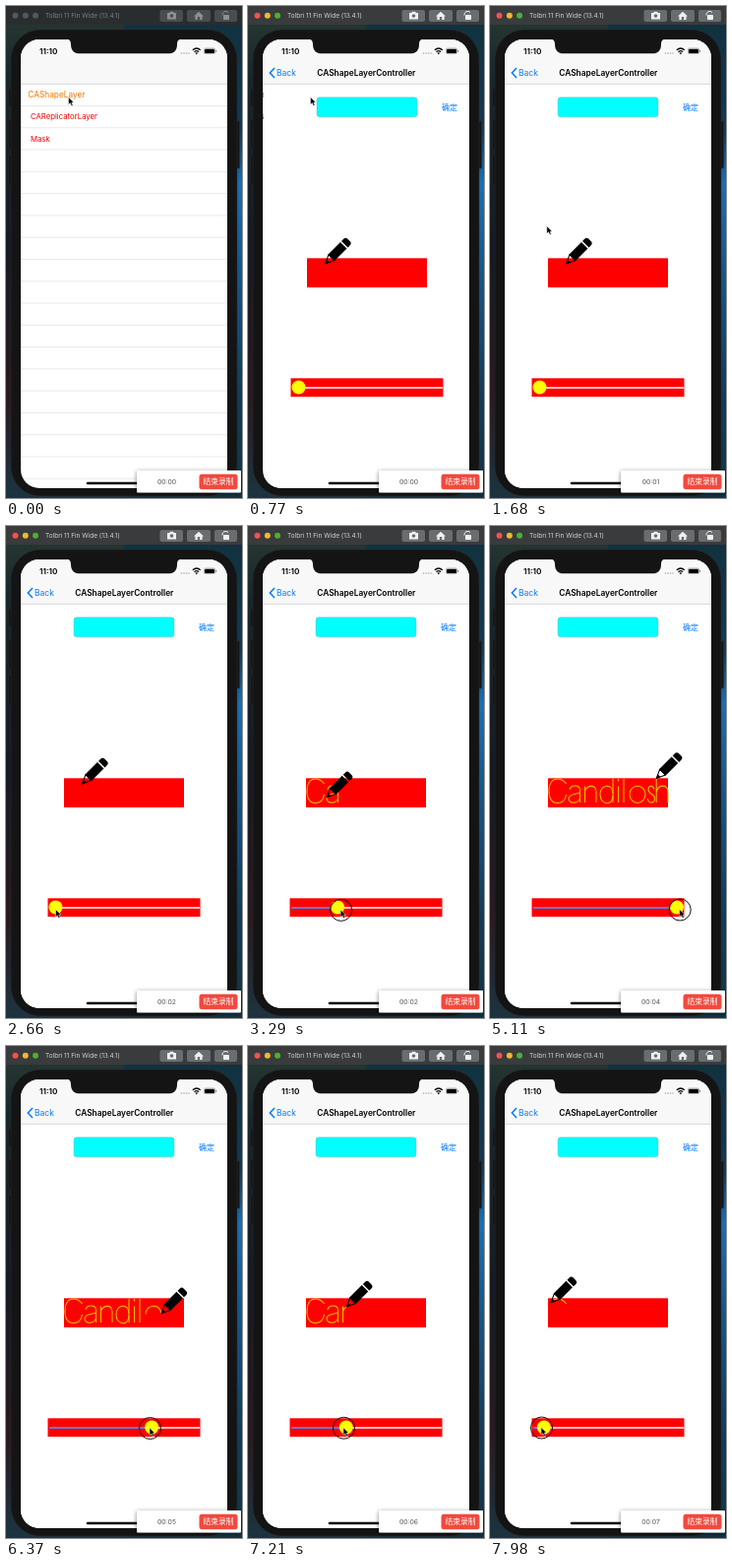
These frames come from a looping animation (240x500 px, 8000 ms). An HTML page:

```html
<!DOCTYPE html>
<html lang="en">
<head>
<meta charset="utf-8">
<title>Shape layer demo</title>
<style>
  html, body { margin: 0; width: 100%; height: 100%; overflow: hidden; background: #10202a; }
  svg { display: block; width: 240px; height: 500px; }
  text { font-family: Inter, "Noto Sans CJK SC", "Noto Sans CJK", sans-serif; }
  .blue { fill: #007aff; }
</style>
</head>
<body>
<svg viewBox="0 0 240 500">
  <defs>
    <linearGradient id="wallLeft" x2="0" y2="1">
      <stop offset="0" stop-color="#2a3a34"/>
      <stop offset=".15" stop-color="#17262a"/>
      <stop offset=".5" stop-color="#161a22"/>
      <stop offset=".8" stop-color="#2a1a20"/>
      <stop offset="1" stop-color="#1c3440"/>
    </linearGradient>
    <linearGradient id="wallRight" x2="0" y2="1">
      <stop offset="0" stop-color="#12303a"/>
      <stop offset=".25" stop-color="#0f3a58"/>
      <stop offset=".36" stop-color="#1a6fb4"/>
      <stop offset=".55" stop-color="#15568c"/>
      <stop offset=".8" stop-color="#103c5a"/>
      <stop offset="1" stop-color="#123444"/>
    </linearGradient>
    <clipPath id="screen"><rect x="15" y="34" width="210" height="456" rx="19"/></clipPath>
    <filter id="shadow" x="-10%" y="-50%" width="120%" height="200%">
      <feDropShadow dx="0" dy="1" stdDeviation="2.2" flood-opacity=".5"/>
    </filter>
  </defs>

  <rect width="120" height="500" fill="url(#wallLeft)"/>
  <rect x="120" width="120" height="500" fill="url(#wallRight)"/>

  <!-- simulator window title bar -->
  <rect id="bar" width="240" height="19"/>
  <g id="lights">
    <circle cx="9.5" cy="9.7" r="3" fill="#ff4f48"/>
    <circle cx="19.8" cy="9.7" r="3" fill="#f5b52a"/>
    <circle cx="30" cy="9.7" r="3" fill="#4fae34"/>
  </g>
  <g id="grayLights" fill="#56595b">
    <circle cx="9.5" cy="9.7" r="3"/><circle cx="19.8" cy="9.7" r="3"/><circle cx="30" cy="9.7" r="3"/>
  </g>
  <g id="tools">
    <text x="40" y="12.2" font-size="6.5" fill="#d2d3d4">Tolbri 11 Fin Wide (13.4.1)</text>
    <g fill="#6a6d6f">
      <rect x="156.5" y="4" width="23.5" height="12" rx="2"/>
      <rect x="184" y="4" width="24" height="12" rx="2"/>
      <rect x="212" y="4" width="23" height="12" rx="2"/>
    </g>
    <g fill="#f0f0f0">
      <path d="M164 7h2l1-1.3h3l1 1.3h2v6.5h-9z"/>
      <path d="M191 10.4l5-4.6 5 4.6h-1.4v3.6h-2.4v-3h-2.4v3h-2.4v-3.6z"/>
      <rect x="221" y="9" width="6" height="5" rx=".8"/>
    </g>
    <circle cx="168.5" cy="10" r="1.8" fill="#6a6d6f"/>
    <path d="M220 9.5a3.5 3.5 0 0 1 6-3" fill="none" stroke="#f0f0f0"/>
  </g>

  <!-- phone body -->
  <g fill="#141414" stroke="#2a2e30" stroke-width=".5">
    <rect x="2.5" y="84" width="4" height="18" rx="1"/>
    <rect x="2.5" y="115" width="4" height="30" rx="1"/>
    <rect x="2.5" y="151" width="4" height="31" rx="1"/>
    <rect x="233.5" y="117" width="4" height="48" rx="1"/>
    <rect x="5" y="24" width="230" height="474" rx="30"/>
  </g>

  <g clip-path="url(#screen)">
    <rect x="15" y="34" width="210" height="456" fill="#fff"/>
    <g id="list">
      <g id="rows" stroke="#e0e0e3" stroke-width=".7"></g>
      <text x="22.3" y="93" font-size="8.3" fill="#f07800">CAShapeLayer</text>
      <g font-size="7.75" fill="#f00000">
        <text x="25" y="115.2">CAReplicatorLayer</text>
        <text x="25" y="137.5">Mask</text>
      </g>
    </g>

    <g id="detail">
      <rect x="15" y="34" width="211" height="456" fill="#fff"/>
      <rect x="69" y="92.8" width="102" height="20" rx="2.8" fill="#0ff" stroke="#7fb4b6" stroke-width=".5"/>
      <text x="196" y="106" font-size="8" class="blue">确定</text>
      <rect x="59" y="256.3" width="122" height="29.7" fill="red"/>
      <g id="word" role="img" aria-label="Candilosh" fill="none" stroke="#e8c400" stroke-width="1.05"></g>
      <g id="pencil"><g transform="rotate(-45)">
        <path d="M0 0L9-4.1V4.1Z" fill="none" stroke="#000" stroke-linejoin="round"/>
        <path d="M0 0L4-2V2ZM8.5-4.6H26.5V4.6H8.5ZM28-4.6H31Q34-4.6 34-1.6V1.6Q34 4.6 31 4.6H28Z"/>
      </g></g>
      <rect x="42.5" y="378.3" width="155" height="18.8" fill="red"/>
      <path d="M44 388H197" stroke="#fff" stroke-width="1.6"/>
      <path id="filled" stroke="#2864dc" stroke-width="1.6"/>
      <circle id="thumb" cy="387.5" r="7" fill="#ff0"/>
    </g>

    <!-- navigation and status bars -->
    <rect x="15" y="34" width="210" height="45" fill="#f8f8f8"/>
    <path d="M15 79.3H225" stroke="#bcbcc0" stroke-width=".6"/>
    <g id="nav">
      <path d="M27 63L22.3 68 27 73" fill="none" stroke="#007aff" stroke-width="1.5"/>
      <text x="29" y="71" font-size="8.5" class="blue">Back</text>
      <text x="120.3" y="71" font-size="8.4" font-weight="600" text-anchor="middle">CAShapeLayerController</text>
    </g>
    <text x="34" y="48.7" font-size="8.2" font-weight="600">11:10</text>
    <g fill="#aaa">
      <circle cx="178.5" cy="48" r=".8"/><circle cx="181" cy="48" r=".8"/>
      <circle cx="183.5" cy="48" r=".8"/><circle cx="186" cy="48" r=".8"/>
    </g>
    <path d="M189.8 44.8q4-3.6 8 0M191.4 46.6q2.4-2 4.8 0" fill="none" stroke="#000" stroke-width="1.2"/>
    <path d="M192.4 47.8q1.4-1 2.8 0l-1.4 1.4z"/>
    <rect x="201.3" y="43" width="11.4" height="5.6" rx="1.5" fill="none" stroke="#777" stroke-width=".5"/>
    <rect x="202" y="43.7" width="10" height="4.2" rx="1"/>
    <path d="M213.6 44.8v2" stroke="#777"/>
    <path d="M83 485H158" stroke="#000" stroke-width="2.6" stroke-linecap="round"/>
  </g>
  <path d="M61 33C65 34 66 36 66 39C66 45 69 48.3 75 48.3H165C171 48.3 174 45 174 39C174 36 175 34 179 33Z" fill="#141414"/>

  <!-- recorder panel -->
  <rect x="133" y="472" width="106" height="22.5" rx="1" fill="#fff" filter="url(#shadow)"/>
  <text id="clock" x="163.5" y="486" font-size="6.8" fill="#555" text-anchor="middle"></text>
  <rect x="196.5" y="475.8" width="39" height="15.4" rx="2.8" fill="#f2493d"/>
  <text x="216" y="486.3" font-size="7.8" font-weight="500" fill="#fff" text-anchor="middle">结束录制</text>

  <g id="pointer">
    <circle id="ring" r="11" fill="none" stroke="#111" stroke-width="1"/>
    <path d="M-.5-.5V7.2L1.3 5.6 2.6 8.4 4 7.7 2.8 5.1H5Z" stroke="#fff" stroke-width=".5"/>
  </g>
</svg>
<script>
const LOOP = 8000, STEP = 70;
const PUSH_START = 210, PRESS_START = 2800;
const THUMB_MIN = 50.5, THUMB_MAX = 190, THUMB_LAG = 40;

// time, x, y
const POINTER = [
  [0, 64, 93], [1190, 64, 93], [2300, 51, 390], [2800, 51, 390], [3990, 157, 391],
  [4600, 194, 390], [5250, 193, 390], [6370, 146.5, 388.5], [7980, 52.5, 388]
];

// Subpaths in writing order; the pen follows each one out and back.
const LETTERS = [
  'M77.5 262C75 258.5 72 257 68.5 257C63 257 60 262 60 269C60 277 63 281.5 68.5 281.5C73 281.5 76.5 279 77.5 273',
  'M81 268C82 262.5 91.5 262.5 91.5 268.5V281M91.5 271C88 272.5 80 272 80 277C80 283 90.5 282.5 91.5 276',
  'M96.5 281V264.5M96.5 270C98 263 108 262 108 270V281',
  'M125 274C125 285 112 284 112 272.8C112 262 125 261 125 272M125 257V281',
  'M130.5 264.5V281M130.5 257V259.5',
  'M136 257V281',
  'M142 272.8A8 8.6 0 0 1 158 272.8A8 8.6 0 0 1 142 272.8',
  'M167 267.5C165.5 263 161 263.5 161 268C161 273 167.5 271.5 167.5 277C167.5 282.5 161 282.5 160.3 277',
  'M169.2 256.5V281V271C170.5 262 181 262 181 270V281'
];

const el = id => document.getElementById(id);
const set = (id, name, value) => el(id).setAttribute(name, value);
const clamp = (v, lo, hi) => Math.min(hi, Math.max(lo, v));

function addPath(parent, d) {
  const path = document.createElementNS('http://www.w3.org/2000/svg', 'path');
  path.setAttribute('d', d);
  el(parent).append(path);
  return path;
}

for (let i = 1; i < 19; i++) addPath('rows', `M15 ${79.2 + 22.28 * i}H225`);

const strokes = LETTERS.join('').split(/(?=M)/).map(d => {
  const path = addPath('word', d);
  return { path, length: path.getTotalLength() };
});
const penTravel = 2 * strokes.reduce((sum, s) => sum + s.length, 0);

function pointerAt(t) {
  const next = POINTER.findIndex(k => k[0] > t);
  if (next < 0) return POINTER[POINTER.length - 1].slice(1);
  const a = POINTER[next - 1], b = POINTER[next];
  const f = (t - a[0]) / (b[0] - a[0]);
  return [a[1] + (b[1] - a[1]) * f, a[2] + (b[2] - a[2]) * f];
}

function drawWord(progress) {
  let rest = penTravel * progress, tip = null;
  for (const { path, length } of strokes) {
    const travelled = clamp(rest, 0, 2 * length);
    path.setAttribute('stroke-dasharray', `${Math.min(travelled, length)} 999`);
    if (travelled > 0 || !tip) tip = path.getPointAtLength(length - Math.abs(length - travelled));
    rest -= 2 * length;
  }
  set('pencil', 'transform', `translate(${tip.x} ${tip.y})`);
}

function drawPush(t) {
  const u = Math.max(0, t - PUSH_START) * 0.0134;
  const left = t > 1000 ? 0 : (1 + u) * Math.exp(-u);
  set('detail', 'transform', `translate(${211 * left} 0)`);
  set('list', 'transform', `translate(${-63 * (1 - left)} 0)`);
  set('nav', 'opacity', left < 0.02 ? 1 : 1 - left);
}

function drawWindow(active) {
  set('bar', 'fill', active ? '#393b3d' : '#2a2d2f');
  set('lights', 'opacity', active ? 1 : 0);
  set('grayLights', 'opacity', active ? 0 : 1);
  set('tools', 'opacity', active ? 1 : 0.5);
}

function draw(t) {
  drawWindow(t >= 140);
  drawPush(t);

  const [x, y] = pointerAt(t);
  const pressed = t >= PRESS_START;
  set('pointer', 'transform', `translate(${x} ${y})`);
  set('ring', 'opacity', pressed ? 1 : 0);

  const thumb = pressed ? clamp(pointerAt(t - THUMB_LAG)[0], THUMB_MIN, THUMB_MAX) : THUMB_MIN;
  set('thumb', 'cx', thumb);
  set('filled', 'd', `M44 388H${thumb > 188 ? 197 : thumb}`);
  drawWord(((thumb - THUMB_MIN) / (THUMB_MAX - THUMB_MIN)) ** 1.1);

  el('clock').textContent = '00:0' + Math.max(0, Math.floor((t - 500) / 1000));
}

const start = performance.now();
function tick() {
  const t = (performance.now() - start) % LOOP;
  draw(t < 140 ? 0 : Math.floor(t / STEP) * STEP);
  requestAnimationFrame(tick);
}
tick();
</script>
</body>
</html>
```
